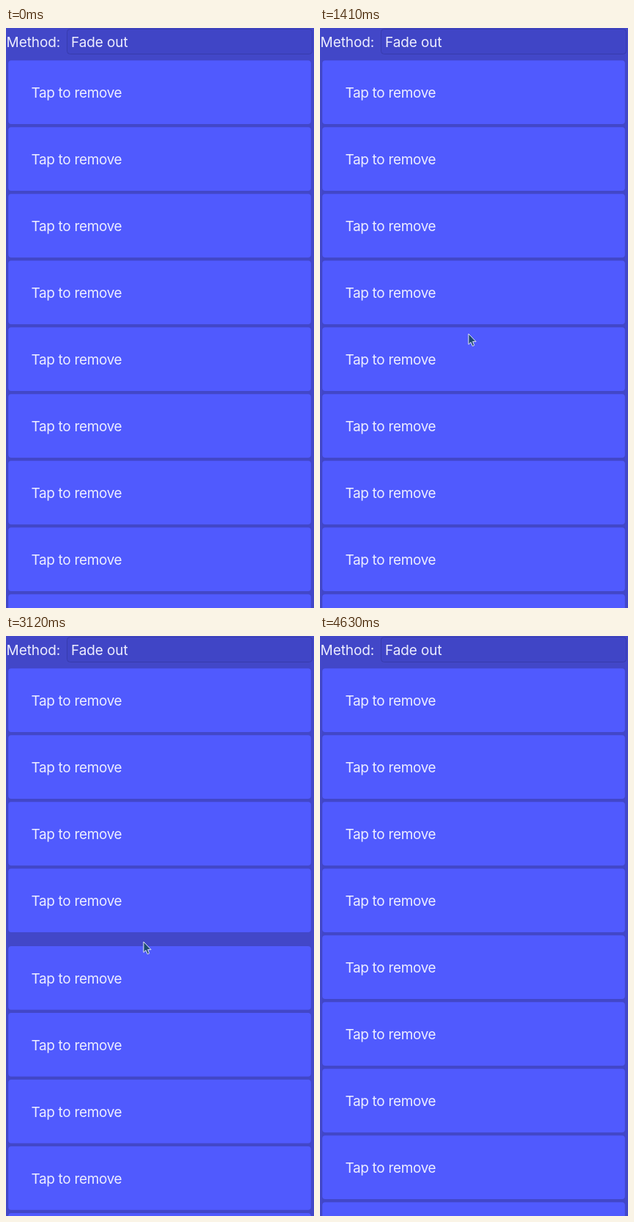
Animation, 421 px wide and 791 px high, one loop 5.1 s. Source, as an HTML page with a canvas:

```html
<!DOCTYPE html>
<html lang="en">
<head>
<meta charset="utf-8">
<style>
  html, body { margin: 0; width: 100%; height: 100%; overflow: hidden; background: #4247c8; }
  canvas { display: block; }
</style>
</head>
<body>
<canvas id="stage" width="421" height="791"></canvas>
<script>
const ctx = document.getElementById('stage').getContext('2d');
const LOOP = 5100, PITCH = 91, TOP = 44;
const PHASE = 352; // length of the fade, and of the slide after it
const PACE = 0.8;  // pointer travel time in ms per pixel

const taps = [
  { at: 690, row: 1 }, { at: 1567, row: 2 }, { at: 2474, row: 4 }, { at: 3564, row: 2 }
];

// Where the pointer rests, and when it gets there
const stops = [
  { at: 0, x: 347, y: 795 },
  { at: 570, x: 187, y: 202 },
  { at: 1130, x: 203, y: 417 },
  { at: 1567, x: 187, y: 290 },
  { at: 2150, x: 190, y: 474 },
  { at: 2474, x: 188, y: 417 },
  { at: 3310, x: 159, y: 315 },
  { at: 4630, x: 406, y: 795 }
];

const arrow = new Path2D('M0 0V14.5L3.2 11.6L5.4 16.8L7.9 15.7L5.7 10.7H10.2Z');
const clamp = v => Math.max(0, Math.min(1, v));
const smooth = p => p * p * (3 - 2 * p);

function text(str, x, y, spacing = 0) {
  ctx.letterSpacing = spacing + 'px';
  ctx.fillStyle = '#edeeff';
  ctx.fillText(str, x, y);
}

function box(x, y, w, h, fill) {
  ctx.beginPath();
  ctx.roundRect(x, y, w, h, 4);
  ctx.fillStyle = fill;
  ctx.fill();
}

function drawHeader() {
  text('Method:', 0.6, 26, -0.1);
  box(83.5, 1.5, 335, 34, '#4045c6');
  ctx.strokeStyle = '#373bad';
  ctx.stroke();
  text('Fade out', 89, 26, -0.1);
}

function drawRows(t) {
  const tap = taps.findLast(({ at }) => t >= at && t < at + 2 * PHASE);
  const progress = tap ? (t - tap.at) / PHASE : 0;
  for (let i = 0; i < 10; i++) {
    const shift = tap && i > tap.row ? clamp(progress - 1) : 0;
    const y = TOP + PITCH * (i - shift);
    ctx.globalAlpha = tap && i === tap.row ? 1 - clamp(progress) : 1;
    box(3.2, y + 0.3, 413.6, 86.8, '#505afe');
    text('Tap to remove', 34.4, y + 51, -0.33);
  }
  ctx.globalAlpha = 1;
}

function drawPointer(t) {
  const next = stops.findIndex(({ at }) => at > t);
  if (next < 1) return;
  const a = stops[next - 1], b = stops[next];
  const dx = b.x - a.x, dy = b.y - a.y;
  const travel = PACE * Math.hypot(dx, dy);
  const p = smooth(clamp(1 - (b.at - t) / travel));
  ctx.save();
  ctx.translate(a.x + dx * p, a.y + dy * p);
  ctx.fillStyle = '#1e4a70';
  ctx.fill(arrow);
  ctx.strokeStyle = '#e4e8f8';
  ctx.stroke(arrow);
  ctx.restore();
}

function frame() {
  const t = performance.now() % LOOP;
  ctx.fillStyle = '#4247c8';
  ctx.fillRect(0, 0, 421, 791);
  ctx.font = '19px Inter, sans-serif';
  drawHeader();
  drawRows(t);
  drawPointer(t);
  requestAnimationFrame(frame);
}
frame();
</script>
</body>
</html>
```
